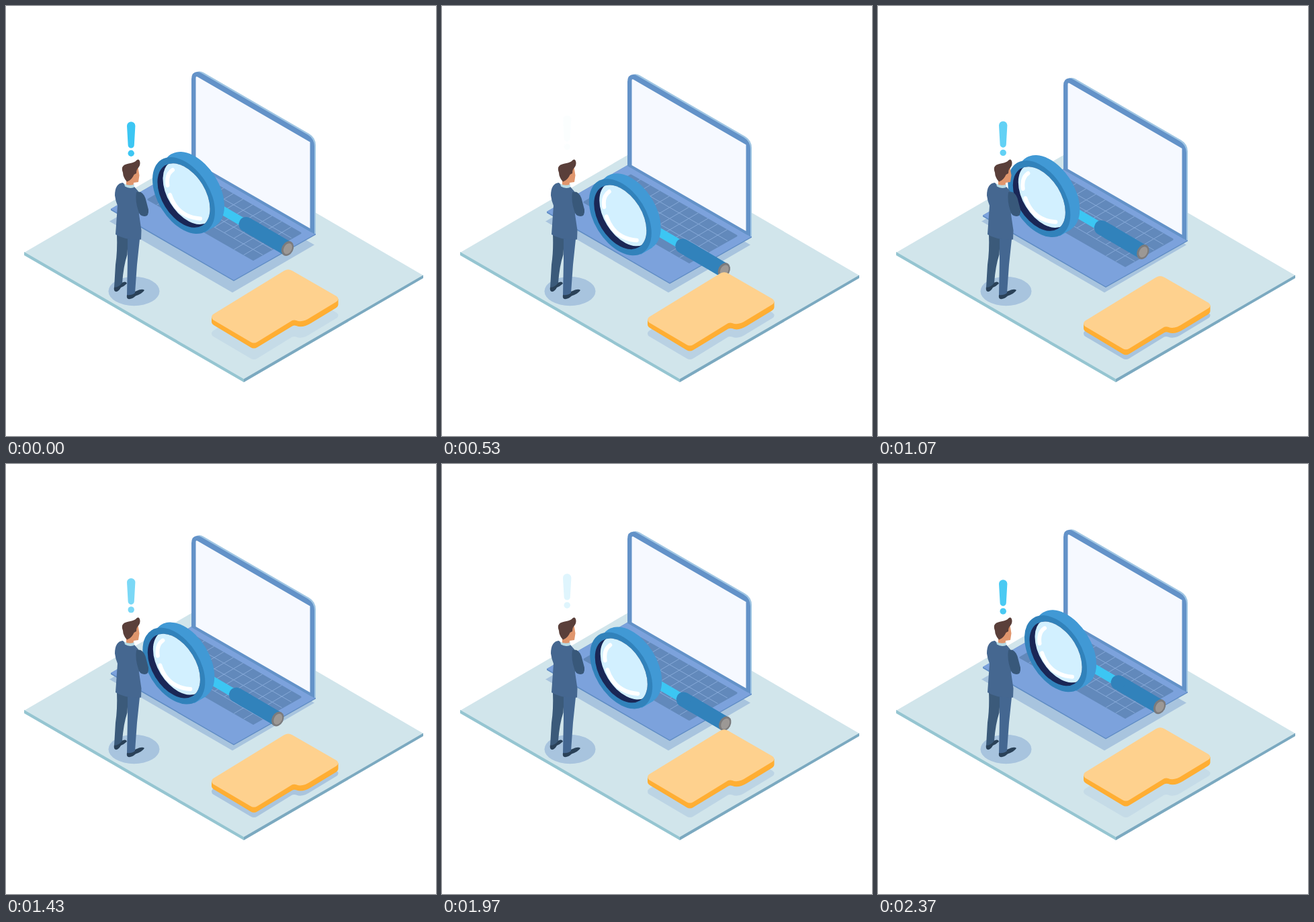
These frames come from a looping animation (640 px wide and 640 px high, 2410 ms). An HTML page:

```html
<!DOCTYPE html>
<html lang="en">
<head>
<meta charset="utf-8">
<title>Search</title>
<style>
  html, body { margin: 0; width: 100%; height: 100%; overflow: hidden; background: #fff; }
  svg { display: block; width: 100vw; height: 100vh; }
</style>
</head>
<body>
<svg viewBox="0 0 640 640">
  <defs>
    <path id="sheet" d="M308 459 L414 394 Q420 390.500 426 394 L492 432 Q497 436 492 440 L454 463 Q441 472 432 468 Q429 467 426 468 L374 500 Q369 503 364 500 L308 467 Q304 463 308 459Z"/>
    <circle id="hole" r="43.700"/>
    <clipPath id="inside"><use href="#hole"/></clipPath>
  </defs>

  <!-- floor -->
  <path fill="#d1e5eb" d="M27 367 L295 211 L621 401 L354 555Z"/>
  <path fill="#95c5d1" d="M27 366 L354 555 V560 L27 371Z"/>
  <path fill="#7ba9c0" d="M354 555 L621 400.500 V405 L354 560Z"/>
  <g fill="#a8c4de">
    <path d="M154 320.500 L276 250 L459 355.500 L337 426.500Z"/>
    <ellipse cx="190.500" cy="424.500" rx="38" ry="21.700"/>
    <use id="shade" href="#sheet" y="24.500"/>
  </g>

  <g id="laptop">
    <path fill="#5f8cc4" d="M156 302 L276 233 L461 339 V340.500 L339 409.500 L156 304Z"/>
    <path fill="#7ca2dc" d="M156 302 L276 233 L461 339 L339 408Z"/>
    <path fill="#6289bb" stroke="#6289bb" stroke-width="3" stroke-linejoin="round" d="M212 288 L281 248 L438 338 L368 377.500Z"/>
    <path id="keys" fill="none" stroke="#86a9d8" stroke-width="1"/>
    <path fill="#a0c6e3" d="M280 100 Q287 95 294 99 L451 190 Q461 196 461 207 V339 L456 338Z"/>
    <path fill="#6392c8" d="M276 234 V109 Q276 98 285 98 Q288 98 291 100 L449 191.500 Q459 197.500 459 209 V339.500Z"/>
    <path fill="#f6f9ff" d="M282.500 107 Q282.500 104 285 105.500 L452.500 202.500 V331 L282.500 233Z"/>
  </g>

  <g id="glass">
    <path stroke="#3cc6f3" stroke-width="13" stroke-linecap="round" d="M322 304 L352 321.500"/>
    <path stroke="#3182bb" stroke-width="22" stroke-linecap="round" d="M357.500 325 L372 333.500"/>
    <path stroke="#3182bb" stroke-width="22" d="M366 330 L419 361"/>
    <g transform="translate(419 361) rotate(28)">
      <ellipse rx="8.500" ry="11.500" fill="#7b7b7d"/>
      <ellipse cx=".5" rx="5.800" ry="8.500" fill="#9c9895"/>
    </g>
    <path stroke="#4199d5" stroke-width="1" fill="#4199d5" d="M241 226 L254 218 L312 327 L295 337Z"/>
    <g transform="matrix(.894 .456 0 .996 278.500 274)"><circle r="52" fill="#4199d5"/></g>
    <g transform="matrix(.894 .456 0 .996 264.500 282)">
      <circle r="52" fill="#3182bb"/>
      <use href="#hole" fill="#1a2756"/>
      <g clip-path="url(#inside)"><use href="#hole" x="9" y="-9" fill="#d2f0ff"/></g>
    </g>
    <path fill="none" stroke="#fff" stroke-width="6" stroke-linecap="round" d="M248 244 Q238 251 240.500 267 M244 281 Q255 314 289 316.500"/>
  </g>

  <g id="folder">
    <path fill="#ffae33" d="M306 463 V470 Q306 473 310 475.500 L364 508 Q369 511 374 508 L426 476.500 Q429 475 432 476 Q441 480 454 472 L491 449.500 Q494.500 447 494.500 444 V436Z"/>
    <use href="#sheet" fill="#fed18e"/>
  </g>

  <g id="man">
    <path fill="#2a4158" d="M161 418 L172 412 Q179 408.500 180 413 Q176 417 171 419 Q167 426 163 425 Q160 424 161 418Z M180 430 L192 425 Q203 419.500 206 423 Q203 428 193 431.500 Q187 437 182 436 Q179 435 180 430Z"/>
    <path fill="#3b5a7a" d="M165 340 L182 345 L180.500 370 Q175 386 173 412 Q168 419 161 419 L163 385 Q166 365 165 340Z"/>
    <path fill="#446791" d="M181 344 L199 347 L195 385 L192 427 Q187 431 180 430 L181 378Z"/>
    <path fill="#e0966d" d="M189 243 L196.500 240 L198.500 252 L197 262 L190 263 L189.500 268 L179 267 L179 257Z"/>
    <path fill="#456790" d="M174 263 Q162 264 162 282 Q163 290 166 297 L163 340 Q178 349 201 347.500 L201.500 334 L198 310 L197 276 L191 269 Q184 272 177 266Z"/>
    <path fill="#b7dbe6" d="M176 264.500 Q183 268.500 191 265.500 L190.500 270 Q183 272.500 177 268.500Z"/>
    <path fill="#38587a" d="M194 277 Q203 274 207.500 286 L212 303 Q213 313 206 313 Q198 312 197 305 Q192 290 194 277Z"/>
    <path fill="#5a3f3a" d="M180 261.500 Q174 255 174 248 Q170 238 179 235.500 C186 233 191 234 195 229 C199 226 201.500 235 197.500 240 Q194 243 194 249 L190.500 251 Q187 259 180 261.500Z"/>
  </g>

  <g id="mark" fill="#3cc6f3">
    <path d="M180 178.500 A6.200 6.200 0 0 1 192.400 178.500 L190.800 207 A4.600 4.600 0 0 1 181.600 207Z"/>
    <circle cx="186.200" cy="219.300" r="4.700"/>
  </g>
</svg>
<script>
  const LOOP = 2410;
  const el = id => document.getElementById(id);
  const [laptop, glass, folder, shade, mark] =
    ['laptop', 'glass', 'folder', 'shade', 'mark'].map(el);

  const COLS = 11, ROWS = 5;
  const key = (u, v) => `${210 + 158 * u + 71 * v} ${288 + 91 * u - 42 * v}`;
  let keys = '';
  for (let c = 1; c < COLS; c++) {
    const inBar = c > 4 && c < 9;
    keys += `M${key(c / COLS, inBar ? 1 / ROWS : 0)}L${key(c / COLS, 1)}`;
  }
  for (let r = 1; r < ROWS; r++) keys += `M${key(0, r / ROWS)}L${key(1, r / ROWS)}`;
  el('keys').setAttribute('d', keys);

  const ease = u => (1 - Math.cos(Math.PI * u)) / 2;
  const move = (node, x, y) => node.setAttribute('transform', `translate(${x} ${y})`);

  // Segment index and progress of t between the given times.
  function segment(times, t) {
    let i = 0;
    while (i < times.length - 2 && t >= times[i + 1]) i++;
    return [i, (t - times[i]) / (times[i + 1] - times[i])];
  }

  const glassTimes = [0, 420, 1130, 1750, LOOP];
  const glassStops = [[0, 0], [3, 34], [-25, 4.5], [3, 34], [0, 0]];
  const markTimes = [0, 522, 1205, 1888, LOOP];

  function draw(t) {
    const sink = ease(2 * t / LOOP);
    move(laptop, 0, 9.7 * sink);
    move(folder, 0, 10 * sink);
    shade.setAttribute('opacity', 0.3 + 0.7 * sink);

    const [i, u] = segment(glassTimes, t);
    const p = ease(u), [ax, ay] = glassStops[i], [bx, by] = glassStops[i + 1];
    const bow = i === 1 || i === 2 ? 3 * Math.sin(Math.PI * p) : 0;
    move(glass, ax + (bx - ax) * p - bow, ay + (by - ay) * p);

    const [j, w] = segment(markTimes, t);
    const shown = j % 2 ? w : 1 - w;
    mark.setAttribute('opacity', shown);
    move(mark, 0, -9.7 * (1 - ease(shown)));
  }

  const start = performance.now();
  function tick() {
    draw((performance.now() - start) % LOOP);
    requestAnimationFrame(tick);
  }
  tick();
</script>
</body>
</html>
```
